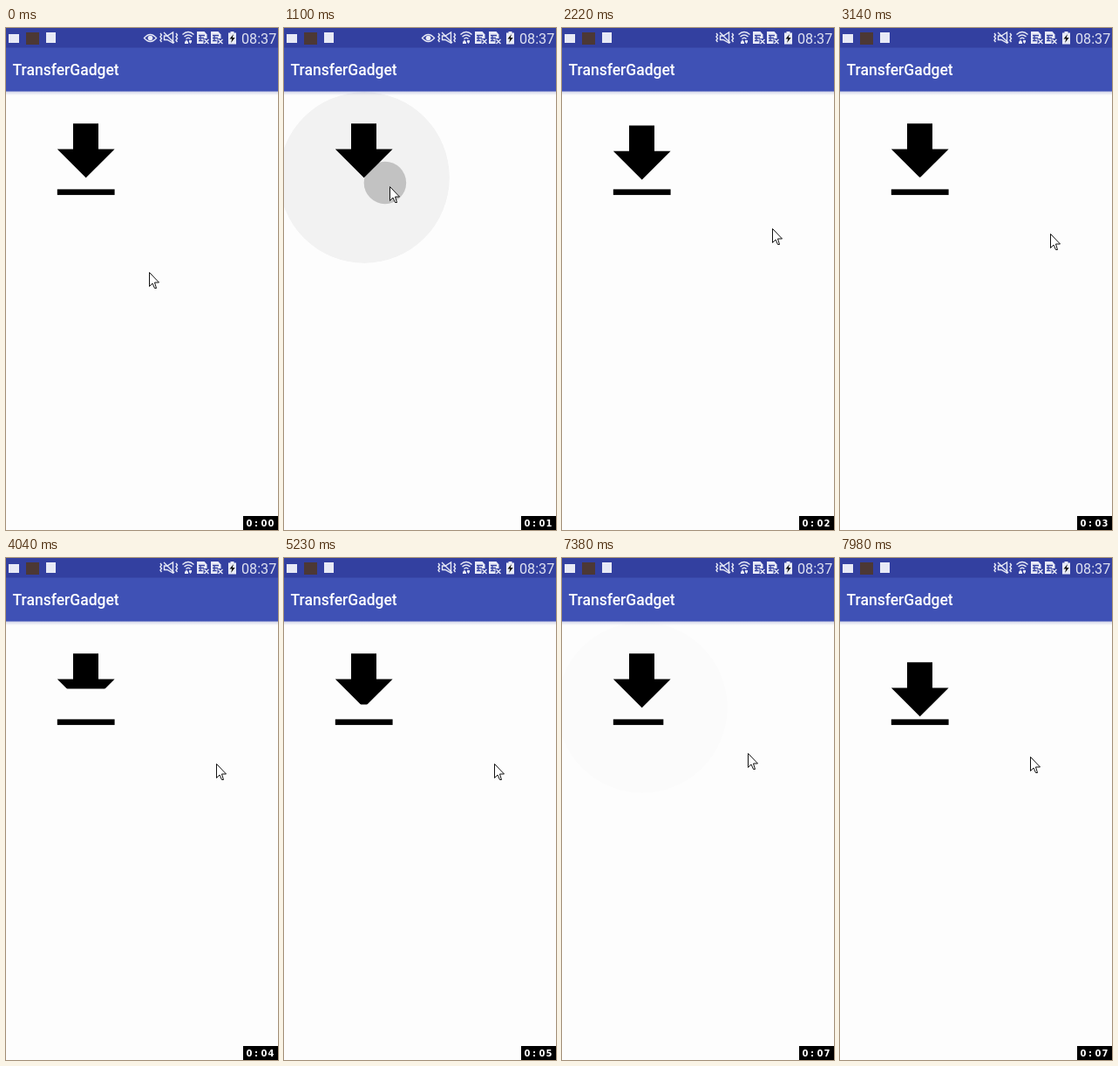
An HTML page for the animation above (8000 ms loop, 312 by 574 pixels).

```html
<!DOCTYPE html>
<html lang="en">
<head>
<meta charset="utf-8">
<title>TransferGadget</title>
<style>
  html, body { margin: 0; width: 100%; height: 100%; overflow: hidden; background: #fdfdfd; }
  svg { display: block; }
  text { font-family: Roboto, sans-serif; fill: #fff; }
  .line { fill: none; stroke: #e8eaf6; stroke-width: 1.4; }
  .fill { fill: #e8eaf6; }
</style>
</head>
<body>
<svg width="312" height="574" viewBox="0 0 312 574">
  <defs>
    <linearGradient id="shadow" x2="0" y2="1">
      <stop offset="0" stop-color="#cdd0e6"/>
      <stop offset="1" stop-color="#fdfdfd"/>
    </linearGradient>
    <clipPath id="mask"><circle cx="92" cy="171" r="98"/></clipPath>
    <clipPath id="reveal"><rect id="revealBox" x="50" y="100" width="90"/></clipPath>
    <g id="sim">
      <path class="fill" d="M0 0H8.500L11.500 3.500V14H0Z"/>
      <path d="M2 4.500H9M2 7.500H8M2 10.500H6.500M4 4V11" fill="none" stroke="#3340a0" stroke-width="1.300"/>
      <path d="M7.500 8H14V15H7.500Z" fill="#3340a0"/>
      <path class="line" d="M8.500 9L13.500 14M13.500 9L8.500 14"/>
    </g>
  </defs>

  <rect width="312" height="574" fill="#fdfdfd"/>
  <rect y="72" width="312" height="5" fill="url(#shadow)"/>
  <rect width="312" height="72.5" fill="#3f51b5"/>
  <rect width="312" height="22.5" fill="#3340a0"/>

  <rect class="fill" x="3" y="7" width="12" height="10"/>
  <rect x="23" y="5" width="15" height="14" fill="#4c3835"/>
  <rect class="fill" x="46" y="5" width="11" height="12"/>
  <g id="eye">
    <path class="line" d="M158.500 11.500Q165.500 3.500 172.500 11.500Q165.500 19.500 158.500 11.500Z"/>
    <circle class="fill" cx="165.500" cy="11.500" r="2.800"/>
  </g>
  <path class="line" d="M177 6l1.500 2l-1.500 2l1.500 2l-1.500 2l1.500 2M195 6l1.500 2l-1.500 2l1.500 2l-1.500 2l1.500 2M181 5L193 17"/>
  <path class="line" d="M181.500 9H185L191.500 5V17L185 13.500H181.500Z"/>
  <path class="line" d="M202.500 7.500Q209 1.500 215.500 7.500M204.500 10Q209 6 213.500 10M206.500 12.500Q209 10 211.500 12.500"/>
  <path class="fill" d="M205 16L207 13.500L209 16V18H205ZM210 14H213V16L211.500 18L210 16Z"/>
  <use href="#sim" x="219" y="4"/>
  <use href="#sim" x="235" y="4"/>
  <path class="fill" d="M257.500 4H261.500V5.500H264V18.500H255V5.500H257.500Z"/>
  <path d="M261 7L256.500 12.500H259.300L258 17L262.700 11H259.800Z" fill="#111"/>
  <text x="270" y="18" font-size="16.200" fill-opacity=".85">08:37</text>
  <text x="7.500" y="54" font-size="17.500" font-weight="500">TransferGadget</text>

  <g id="press" clip-path="url(#mask)">
    <circle id="halo" cx="92" cy="171" r="98" fill-opacity=".043"/>
    <circle id="ripple"/>
  </g>
  <g clip-path="url(#reveal)">
    <path id="arrow" d="M77 109.300H106V138.500H124.600L91.700 171.200L58.800 138.500H77Z"/>
  </g>
  <rect id="bar" x="58.800" y="184.400" height="6.500"/>

  <rect x="272" y="558" width="40" height="16"/>
  <text id="counter" x="275.500 285 292.500 300.500" y="569.500" font-size="10" font-weight="700"
    style="font-family:'DejaVu Sans',sans-serif"></text>
  <path id="cursor" d="M.5 .5V16.500L4 13L6.500 18.500H8.500L6.500 12H11.500Z" fill="#fff" stroke="#111"/>
</svg>

<script>
const LOOP = 8000, PREPARE = 1012, SLIDE = 600, CYCLE = 1057;
const BAR_TOP = 184.4, CENTER = { x: 92, y: 171 };
const taps = [
  { at: 1075, x: 118.2, y: 177.5 },
  { at: 6714, x: 179, y: 174 },
];
// time, x, y
const cursorKeys = [
  [0, 164, 279], [100, 164, 279], [650, 107, 168], [930, 121, 181], [1250, 121, 181],
  [2050, 241, 229], [2500, 241, 229], [2700, 241, 235], [5700, 241, 235],
  [6550, 180, 194], [7050, 180, 194], [7480, 218, 227], [LOOP, 218, 227],
];

const el = id => document.getElementById(id);
const set = (id, attrs) => {
  for (const name in attrs) el(id).setAttribute(name, attrs[name]);
};
const ramp = (t, from, to) => Math.min(1, Math.max(0, (t - from) / (to - from)));
const mix = (a, b, k) => a + (b - a) * k;
const smooth = k => k * k * (3 - 2 * k);

function drawPress(tap, age) {
  const grow = ramp(age, 0, 149);
  el("press").style.display = tap && age < 750 ? "" : "none";
  if (!tap) return;
  set("ripple", {
    cx: mix(tap.x, CENTER.x, grow / 2),
    cy: mix(tap.y, CENTER.y, grow / 2),
    r: 139 * grow,
    "fill-opacity": 0.2 * (1 - ramp(age, 200, 550)),
  });
  set("halo", { opacity: 1 - ramp(age, 350, 750) });
}

function drawIcon(tap, age) {
  const grow = tap ? smooth(ramp(age, 200, 800)) : 1;
  set("bar", { width: 65.8 * grow });

  // The arrow sinks behind the bar, then is uncovered again from its top.
  let shift = 0, bottom = BAR_TOP;
  if (tap && age >= PREPARE) {
    const phase = (age - PREPARE) % CYCLE;
    if (phase < SLIDE) shift = 75 * (phase / SLIDE) ** 2.35;
    else bottom = mix(109, 171.2, ramp(phase, SLIDE, CYCLE));
  }
  set("arrow", { transform: `translate(0 ${shift})` });
  set("revealBox", { height: bottom - 100 });
}

function drawCursor(t) {
  const next = cursorKeys.findIndex(key => key[0] > t);
  const a = cursorKeys[next - 1], b = cursorKeys[next];
  const k = smooth(ramp(t, a[0], b[0]));
  set("cursor", { transform: `translate(${Math.round(mix(a[1], b[1], k))} ${Math.round(mix(a[2], b[2], k))})` });
}

function draw() {
  const t = performance.now() % LOOP;
  const tap = taps.filter(item => item.at <= t).pop();
  const age = tap ? t - tap.at : 0;
  drawPress(tap, age);
  drawIcon(tap, age);
  drawCursor(t);
  el("eye").style.display = t < 1950 ? "" : "none";
  el("counter").textContent = "0:0" + Math.floor(t / 1000);
  requestAnimationFrame(draw);
}
draw();
</script>
</body>
</html>
```
